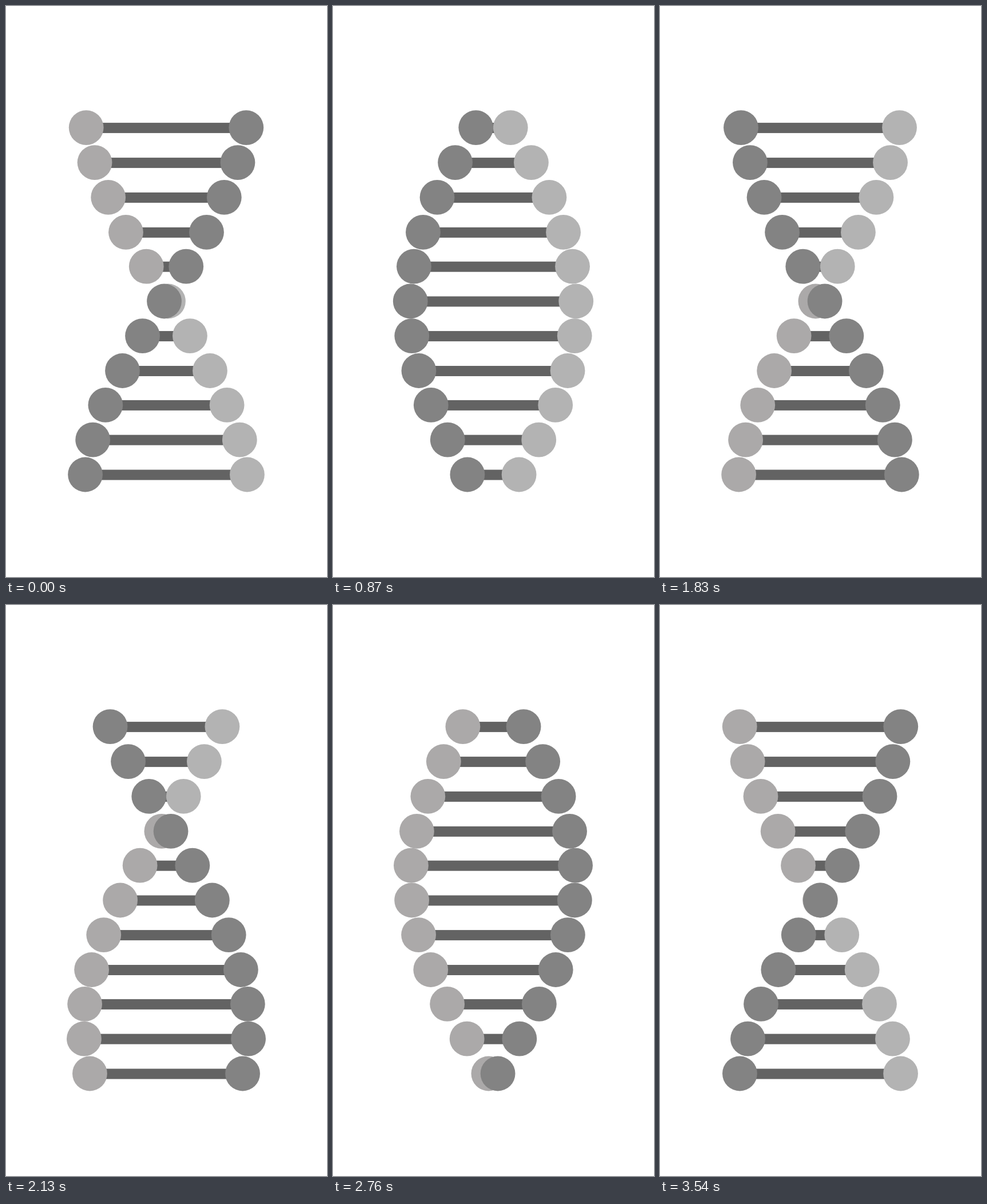
These frames come from a looping animation (561x998 px, 3.57 s). An HTML page:

```html
<!DOCTYPE html>
<html lang="en">
<head>
<meta charset="utf-8">
<title>Helix</title>
<style>
  html, body { margin: 0; width: 100%; height: 100%; overflow: hidden; background: #fff; }
  svg { display: block; width: 100%; height: 100%; }
</style>
</head>
<body>
<svg id="stage" viewBox="0 0 561 998"></svg>
<script>
const NS = "http://www.w3.org/2000/svg";
const LOOP = 3570, STEP = 30;          // playback, ms
const PERIOD = 3540, HALF = PERIOD / 2; // one full twist, ms
const TURN = 1650, HOLD = 13.5;        // leftmost moment of the top dot, short rest there
const ROW_LEAD = 150;                  // each row runs ahead of the one above
const CX = 280, AMP = 144.8, R = 30.4, BAR = 18;
const ROWS = [212.6, 273.6, 334.4, 395.4, 455.2, 516, 576.6, 637.5, 697.4, 758.1, 819];

const stage = document.getElementById("stage");

function add(tag, attrs) {
  const el = document.createElementNS(NS, tag);
  for (const k in attrs) el.setAttribute(k, attrs[k]);
  return stage.appendChild(el);
}

const rows = ROWS.map(y => ({
  bar: add("rect", { y: y + 0.5 - BAR / 2, height: BAR, fill: "#636363" }),
  light: add("circle", { cy: y, r: R }),
  dark: add("circle", { cy: y, r: R, fill: "#838383" })
}));

const mod = (a, n) => ((a % n) + n) % n;

// Sideways offset of the dark dot
function swing(u) {
  const away = Math.abs(mod(u - TURN + HALF, PERIOD) - HALF);
  return -AMP * Math.cos(Math.PI * Math.max(0, away - HOLD) / HALF);
}

function draw(ms) {
  const n = Math.floor(mod(ms, LOOP) / STEP);
  const t = n ? n * STEP : STEP / 2; // the loop restarts half a step in
  rows.forEach((row, i) => {
    const d = swing(t + i * ROW_LEAD);
    row.bar.setAttribute("x", CX - Math.abs(d));
    row.bar.setAttribute("width", 2 * Math.abs(d));
    row.dark.setAttribute("cx", CX + d);
    row.light.setAttribute("cx", CX - d);
    row.light.setAttribute("fill", d > 0 ? "#aba9a9" : "#b3b3b3");
  });
}

const start = performance.now();
function tick() {
  draw(performance.now() - start);
  requestAnimationFrame(tick);
}
draw(0);
requestAnimationFrame(tick);
</script>
</body>
</html>
```
